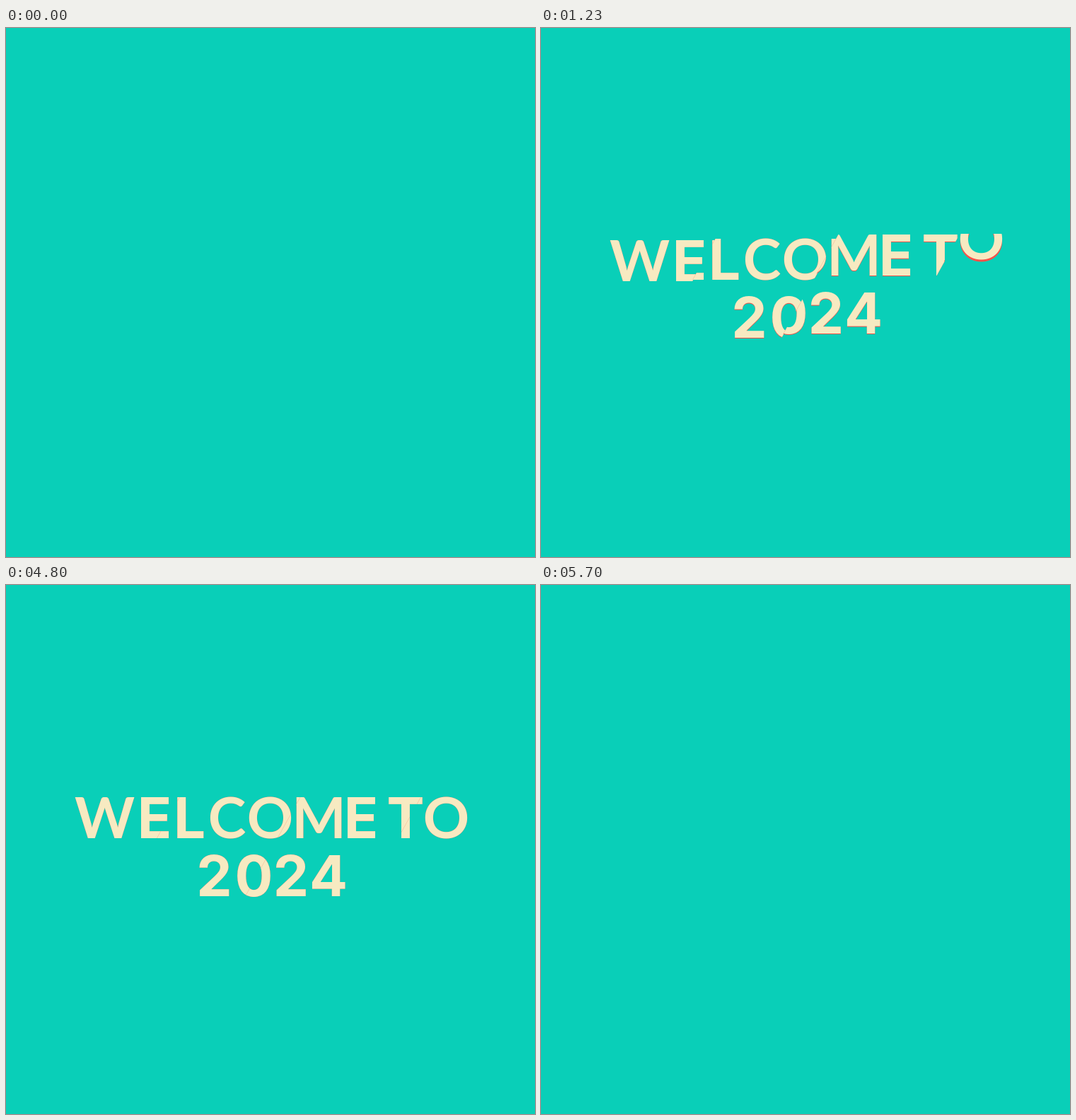
An HTML page for the animation above (6.01 s loop, 748 px wide and 748 px high).

```html
<!DOCTYPE html>
<html lang="en">
<head>
<meta charset="utf-8">
<title>Welcome to 2024</title>
<style>
  html, body { margin: 0; width: 100%; height: 100%; overflow: hidden; background: #09cfb8; }
  svg { display: block; width: 100vw; height: 100vh; }
  text { font: 700 81px Lato, sans-serif; text-anchor: middle; }
  .wide { font: 700 80px Inter, sans-serif; }
  .back { fill: #fb5149; }
  .front { fill: #f7eac1; }
</style>
</head>
<body>
<svg id="stage" viewBox="0 0 748 748">
  <defs>
    <g id="title">
      <text y="357.7"><tspan x="139.5">W</tspan><tspan class="wide" x="210 259.5">EL</tspan><tspan x="312.5 373.5 442.5">COM</tspan><tspan class="wide" x="502 533 565">E T</tspan><tspan x="622.5">O</tspan></text>
      <text class="wide" y="439.8" x="294.5 350.5 403 456">2024</text>
    </g>
  </defs>
</svg>
<script>
const LOOP = 6010, TOP = 291, BOTTOM = 457, TRAVEL = BOTTOM - TOP;
const LEAN = 46;                          // half the sideways run of each cut
const CUTS = [-60, 204.5, 375, 545.5, 810]; // cut positions at mid height
const ENTER = { start: 138, gap: 250, length: 1400, lag: 21 };
const LEAVE = { start: 4700, gap: 66.7, length: 800, lag: 6 };
const stage = document.getElementById('stage');

function add(parent, tag, attrs) {
  const node = document.createElementNS('http://www.w3.org/2000/svg', tag);
  for (const key in attrs) node.setAttribute(key, attrs[key]);
  return parent.appendChild(node);
}

const strips = CUTS.slice(0, -1).map((left, i) => {
  const right = CUTS[i + 1] + 0.8;        // slight overlap hides the seam
  const clip = add(stage.querySelector('defs'), 'clipPath', { id: 'cut' + i });
  add(clip, 'polygon', { points: [
    left + LEAN, TOP, right + LEAN, TOP, right - LEAN, BOTTOM, left - LEAN, BOTTOM
  ].join(' ') });
  const group = add(stage, 'g', { 'clip-path': `url(#cut${i})` });
  const layer = name => add(group, 'use', { href: '#title', class: name });
  return { back: layer('back'), front: layer('front') };
});

const expoIn = p => 2 ** (10 * (p - 1)) * p + p ** 6 * (1 - p);

function progress(t, move, i, delay) {
  const p = (t - move.start - move.gap * i - delay) / move.length;
  return Math.min(1, Math.max(0, p));
}

function shift(t, i, enterDelay, leaveDelay) {
  const above = expoIn(1 - progress(t, ENTER, i, enterDelay));
  const below = expoIn(progress(t, LEAVE, i, leaveDelay));
  return TRAVEL * (below - above);
}

function place(node, y) {
  node.setAttribute('transform', `translate(0 ${y.toFixed(3)})`);
}

function draw() {
  const t = performance.now() % LOOP;
  strips.forEach(({ back, front }, i) => {
    place(back, shift(t, i, -ENTER.lag, LEAVE.lag));
    place(front, shift(t, i, 0, 0));
  });
  requestAnimationFrame(draw);
}
draw();
</script>
</body>
</html>
```
